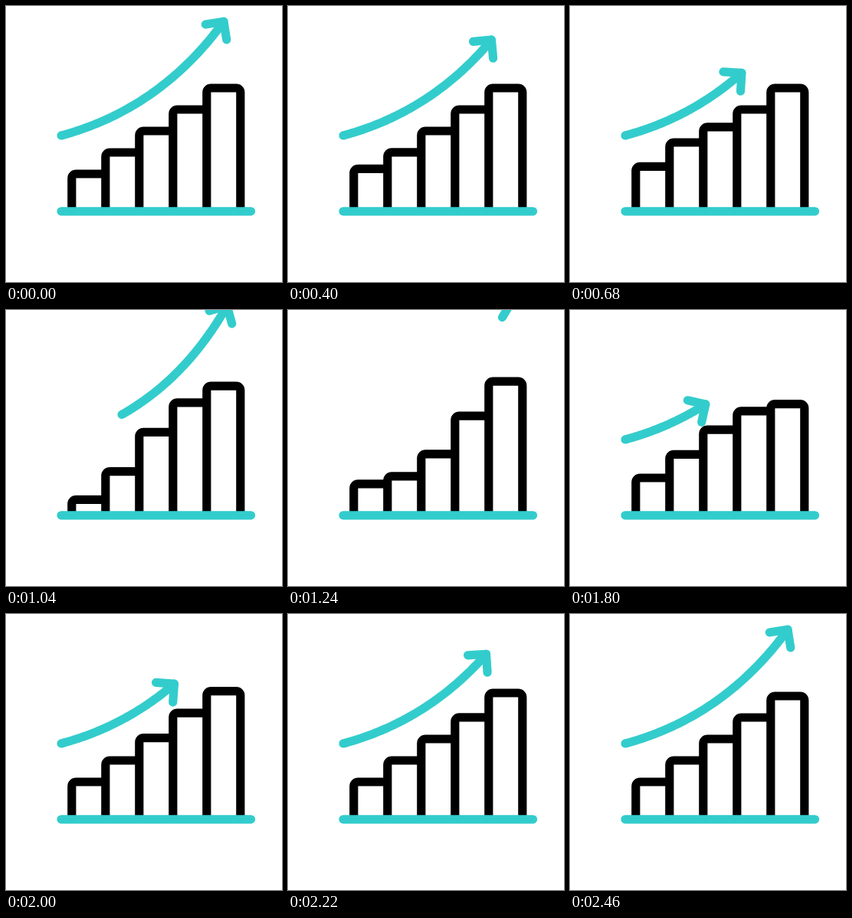
An HTML page with a canvas that plays this animation: 360 px wide and 360 px high, repeating every 3000 ms.

```html
<!DOCTYPE html>
<html lang="en">
<head>
<meta charset="utf-8">
<title>Growth chart</title>
<style>
  html, body { margin: 0; width: 100%; height: 100%; overflow: hidden; background: #fff; }
  canvas { display: block; width: 360px; height: 360px; }
</style>
</head>
<body>
<canvas id="stage" width="360" height="360"></canvas>
<script>
const ctx = document.getElementById('stage').getContext('2d');
const LOOP = 3000, STEP = 20;
const TEAL = '#33cccc', BLACK = '#000';
const BAR_DELAY = 155, BAR_WIDTH = 44, BASE_Y = 267.8;

// [time, value] pairs
const BAR_KEYS = [[220, 0], [595, -14.3], [1010, 29], [1425, -7.5], [1790, 0]];
const DRAW_KEYS = [[1300, 0.05], [1460, 0.092], [1800, 0.44], [2000, 0.645], [2360, 0.97], [2460, 1]];
const PULL = { start: 220, end: 690, tip: 0.667 };
const EXIT_END = 1290;

// Quadratic routes: start, control, end
const REST_ROUTE = [[72, 169], [201.4, 134], [284, 20.3]];
const LAUNCH_ROUTE = [[72, 169], [211, 130.5], [288.3, -5.3]];

const clamp = (v, a, b) => Math.min(b, Math.max(a, v));
const smooth = p => p * p * (3 - 2 * p);
const mix = (a, b, p) => a + (b - a) * p;

function findSpan(keys, t) {
  let i = 0;
  while (i < keys.length - 2 && t > keys[i + 1][0]) i++;
  const [t0, v0] = keys[i], [t1, v1] = keys[i + 1];
  return { i, v0, v1, length: t1 - t0, p: clamp((t - t0) / (t1 - t0), 0, 1) };
}

// Stops at every key
function eased(keys, t) {
  const { v0, v1, p } = findSpan(keys, t);
  return mix(v0, v1, smooth(p));
}

// Flows through the inner keys, rests at both ends
function flowing(keys, t) {
  const { i, v0, v1, length, p } = findSpan(keys, t);
  const slope = k => k === 0 || k === keys.length - 1 ? 0 :
    (keys[k + 1][1] - keys[k - 1][1]) / (keys[k + 1][0] - keys[k - 1][0]);
  const q = 1 - p;
  return mix(v0, v1, smooth(p)) +
    length * p * q * (slope(i) * q - slope(i + 1) * p);
}

function bentRoute(bend) {
  return REST_ROUTE.map((point, i) =>
    point.map((v, axis) => mix(v, LAUNCH_ROUTE[i][axis], bend)));
}

function routePoint([a, b, c], u) {
  return [0, 1].map(k => mix(mix(a[k], b[k], u), mix(b[k], c[k], u), u));
}

function routeAngle([a, b, c], u) {
  const [dx, dy] = [0, 1].map(k => mix(b[k] - a[k], c[k] - b[k], u));
  return Math.atan2(dy, dx);
}

function arrowPose(t) {
  if (t < PULL.end) {
    const p = clamp((t - PULL.start) / (PULL.end - PULL.start), 0, 1);
    return { tail: 0, tip: mix(1, PULL.tip, smooth(p)), bend: 0 };
  }
  if (t < EXIT_END) {
    const k = (t - PULL.end) / (1040 - PULL.end);
    return { tail: 0.305 * k ** 2.5, tip: mix(PULL.tip, 1, k * k), bend: Math.min(k * k, 1) };
  }
  return { tail: 0, tip: flowing(DRAW_KEYS, t), bend: 0 };
}

function strokePoints(points) {
  ctx.beginPath();
  points.forEach(([x, y]) => ctx.lineTo(x, y));
  ctx.stroke();
}

function drawArrow(t) {
  const { tail, tip, bend } = arrowPose(t);
  if (tail > 1.1) return;
  const route = bentRoute(bend);
  strokePoints(Array.from({ length: 61 }, (_, i) => routePoint(route, mix(tail, tip, i / 60))));

  const [x, y] = routePoint(route, tip);
  const back = routeAngle(route, tip) + Math.PI;
  const arm = side => {
    const a = back + side * Math.PI / 4;
    return [x + 24 * Math.cos(a), y + 24 * Math.sin(a)];
  };
  strokePoints([arm(1), [x, y], arm(-1)]);
}

function drawBar(i, t) {
  const left = 85.8 + BAR_WIDTH * i, right = left + BAR_WIDTH;
  const top = 219 - 28 * i + eased(BAR_KEYS, t - BAR_DELAY * i);
  ctx.beginPath();
  ctx.moveTo(left, BASE_Y);
  ctx.arcTo(left, top, right, top, 5.5);
  if (i === 4) {
    ctx.arcTo(right, top, right, BASE_Y, 5.5);
    ctx.lineTo(right, BASE_Y);
  } else {
    ctx.lineTo(right, top);
  }
  ctx.stroke();
}

function draw(t) {
  ctx.fillStyle = '#fff';
  ctx.fillRect(0, 0, 360, 360);
  ctx.lineWidth = 11.2;
  ctx.lineJoin = 'round';

  ctx.lineCap = 'butt';
  ctx.strokeStyle = BLACK;
  for (let i = 0; i < 5; i++) drawBar(i, t);

  ctx.lineCap = 'round';
  ctx.strokeStyle = TEAL;
  strokePoints([[72, BASE_Y], [319.5, BASE_Y]]);
  drawArrow(t);
}

const started = performance.now();
function tick() {
  const t = (performance.now() - started) % LOOP;
  draw(Math.floor(t / STEP) * STEP);
  requestAnimationFrame(tick);
}
tick();
</script>
</body>
</html>
```
